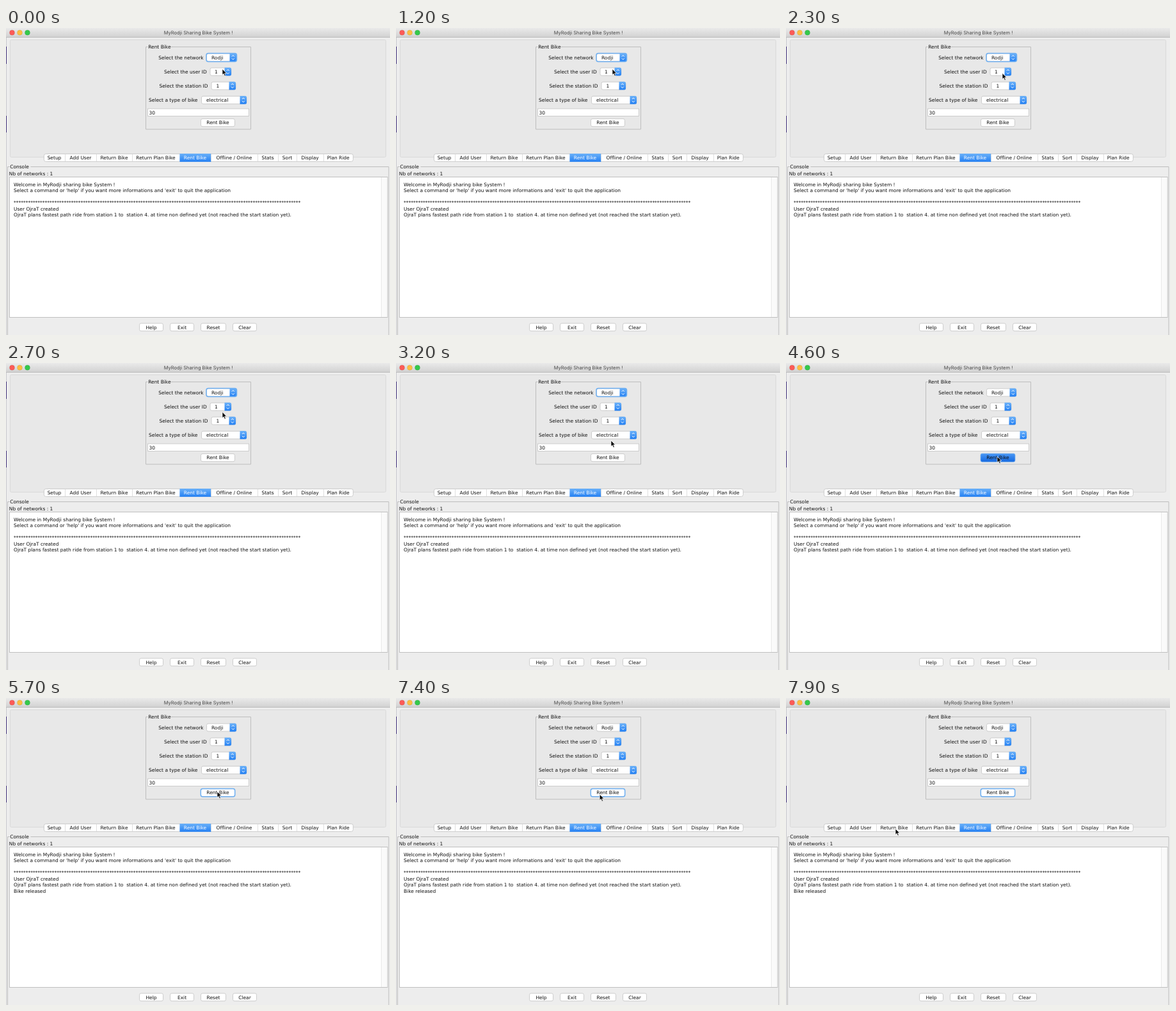
An HTML page for the animation above (8 s loop, 600 by 479 pixels).

```html
<!DOCTYPE html>
<html lang="en">
<head>
<meta charset="utf-8">
<title>Bike sharing window</title>
<style>
html, body { margin: 0; width: 100%; height: 100%; overflow: hidden; background: #ededed }
svg { display: block }
text { font: 7.48px "DejaVu Sans", sans-serif; fill: #111; text-rendering: geometricPrecision; white-space: pre }
.title { font: 7.5px Inter, sans-serif; fill: #484848 }
.mid { text-anchor: middle }
.control { fill: #fff; stroke: #c3c3c3; stroke-width: .8 }
.ring { fill: none; stroke: #6fb0f2; stroke-width: 1.5 }
.frame { fill: none; stroke: #bdbdbd }
</style>
</head>
<body>
<svg id="stage" width="600" height="479" viewBox="0 0 600 479">
  <defs>
    <linearGradient id="bar" x2="0" y2="1"><stop stop-color="#eaeaea"/><stop offset="1" stop-color="#d2d2d2"/></linearGradient>
    <linearGradient id="blue" x2="0" y2="1"><stop stop-color="#6bb1f9"/><stop offset="1" stop-color="#2480f3"/></linearGradient>
    <linearGradient id="pressed" x2="0" y2="1"><stop stop-color="#4a98f5"/><stop offset="1" stop-color="#1468e0"/></linearGradient>
  </defs>
</svg>
<script>
const LOOP = 8000, PRESS = 4500, RELEASE = 5600;
const stage = document.getElementById('stage');

const rect = (x, y, w, h, attrs) => `<rect x="${x}" y="${y}" width="${w}" height="${h}" ${attrs}/>`;
const label = (x, y, text, cls = '') => `<text x="${x}" y="${y}" class="${cls}">${text}</text>`;
const control = (x, y, w, h, r = 2.5) => rect(x, y, w, h, `rx="${r}" class="control"`);
const ring = (id, x, y, w, h) => rect(x, y, w, h, `id="${id}" rx="3" class="ring"`);
const button = (x, y, w, text) => control(x, y, w, 12) + label(x + w / 2, y + 8.8, text, 'mid');

function combo(x, right, y, textX, text) {
  const cap = right - 10.5, c = right - 5.2, m = y + 6;
  return control(x, y, right - x, 12) +
    `<path d="M${cap} ${y - .4}h8q2.5 0 2.5 2.5v7.8q0 2.5-2.5 2.5h-8z" fill="url(#blue)"/>` +
    `<path d="M${c - 2} ${m - 1.4}l2-2 2 2m-4 2.8l2 2 2-2" fill="none" stroke="#fff" stroke-width="1"/>` +
    label(textX, y + 8.8, text);
}

// Border with a gap for its caption
const group = (x, y, w, h, gap, text) =>
  `<path class="frame" d="M${x + 3} ${y}H${x}v${h}h${w}v${-h}H${x + gap}"/>` + label(x + 3.7, y + 2.8, text);

function tabs() {
  const names = ['Setup', 'Add User', 'Return Bike', 'Return Plan Bike', 'Rent Bike',
    'Offline / Online', 'Stats', 'Sort', 'Display', 'Plan Ride'];
  const edges = [59, 92, 141, 197, 271, 320, 393, 425, 454, 496, 542.5];
  return control(59.4, 196.4, 483, 12, 3) + names.map((name, i) => {
    const x = edges[i], w = edges[i + 1] - x, active = name === 'Rent Bike';
    return (active ? rect(x + .4, 196, w, 12.8, 'fill="url(#blue)"')
                   : i ? rect(x, 196.8, .8, 11.2, 'fill="#d6d6d6"') : '') +
      `<text x="${x + w / 2}" y="205" class="mid" ${active ? 'style="fill:#fff"' : ''}>${name}</text>`;
  }).join('');
}

const lights = ['#fc5b57', '#fdbe41', '#35c84b'].map((color, i) =>
  `<circle cx="${9.5 + 12 * i}" cy="7.3" r="4" fill="${color}" stroke="#0002" stroke-width=".6"/>`).join('');

const consoleLines = [
  'Welcome in MyRodji sharing bike System !',
  "Select a command or 'help' if you want more informations and 'exit' to quit the application",
  '',
  '*'.repeat(120),
  'User OjraT created',
  'OjraT plans fastest path ride from station 1 to  station 4. at time non defined yet (not reached the start station yet).'
].map((line, i) => label(12, 246.7 + 9.55 * i, line)).join('');

stage.innerHTML += [
  rect(0, 0, 600, 479, 'fill="#ededed"'),
  rect(0, 0, 600, 14, 'fill="url(#bar)"'),
  rect(0, 14, 600, 1, 'fill="#bcbcbc"'),
  lights,
  label(300.5, 10.2, 'MyRodji Sharing Bike System !', 'title mid'),
  rect(0, 15, 1, 464, 'fill="#c9c9cd"'),
  rect(0, 29, 1, 27, 'fill="#40307a"'),
  rect(0, 137, 1, 26, 'fill="#40307a"'),
  rect(6.5, 18.5, 587, 183, 'rx="2" fill="#e8e8e8" stroke="#d9d9d9"'),

  group(218.5, 29.5, 164, 128.5, 39, 'Rent Bike'),
  label(238.3, 48.8, 'Select the network'),
  label(247, 71, 'Select the user ID'),
  label(239.5, 93, 'Select the station ID'),
  label(223, 115.3, 'Select a type of bike'),
  combo(313.5, 360, 40, 321, 'Rodji'),
  ring('comboRing', 313, 39.5, 47.5, 13),
  combo(319, 352, 62.2, 326, '1'),
  combo(321, 359, 84.2, 328.5, '1'),
  combo(305.5, 376, 106.4, 313, 'electrical'),
  control(221.5, 126, 158, 11.5, 0),
  label(223.5, 134.8, '30'),
  control(304.5, 141.7, 53, 12),
  rect(304, 141.3, 54, 13, 'id="pressedFill" rx="2.5" fill="url(#pressed)" stroke="#7db4ee" stroke-width=".8"'),
  ring('buttonRing', 304.3, 141.4, 53.4, 12.6),
  label(331, 150.4, 'Rent Bike', 'mid'),
  tabs(),

  group(2.5, 216.5, 595.5, 265, 36, 'Console'),
  label(4.8, 230, 'Nb of networks : 1'),
  rect(5.5, 232.5, 590.5, 219, 'fill="#fff" stroke="#bfbfbf"'),
  rect(586, 233, 9.5, 218, 'fill="#fafafa"'),
  rect(586, 233, .8, 218, 'fill="#e6e6e6"'),
  consoleLines,
  `<g id="released">${label(12, 304, 'Bike released')}</g>`,
  button(208.5, 460.8, 37, 'Help'),
  button(256.5, 460.8, 37, 'Exit'),
  button(304.5, 460.8, 39, 'Reset'),
  button(354.5, 460.8, 37, 'Clear'),
  '<path id="cursor" d="M0 0V9.2L2.1 7.3 3.7 10.9 5.3 10.2 3.7 6.7H6.6Z" fill="#000" stroke="#fff" stroke-width=".7"/>'
].join('');

// Pointer stops: time, x, y
const path = [
  [0, 338, 64], [1800, 338, 64], [2000, 338, 70], [2600, 338, 71], [2800, 338, 82],
  [3200, 336, 121], [3600, 332, 126], [3800, 330, 141], [4000, 330, 141], [4100, 330, 145],
  [4200, 330, 145], [4300, 330, 146], [7300, 330, 146], [7900, 171, 204], [8000, 171, 204]
];

function pointer(t) {
  const i = path.findIndex(stop => stop[0] > t);
  const [t0, x0, y0] = path[i - 1], [t1, x1, y1] = path[i];
  const p = (t - t0) / (t1 - t0), e = t1 - t0 > 500 ? p * p * (3 - 2 * p) : p;
  return [x0 + (x1 - x0) * e, y0 + (y1 - y0) * e];
}

const show = (id, visible) =>
  document.getElementById(id).setAttribute('visibility', visible ? 'visible' : 'hidden');

function draw(now) {
  const t = Math.floor(now % LOOP / 100) * 100;
  document.getElementById('cursor').setAttribute('transform', `translate(${pointer(t)})`);
  show('comboRing', t < PRESS);
  show('pressedFill', t >= PRESS && t < RELEASE);
  show('buttonRing', t >= RELEASE);
  show('released', t >= RELEASE);
  requestAnimationFrame(draw);
}
draw(performance.now());
</script>
</body>
</html>
```
